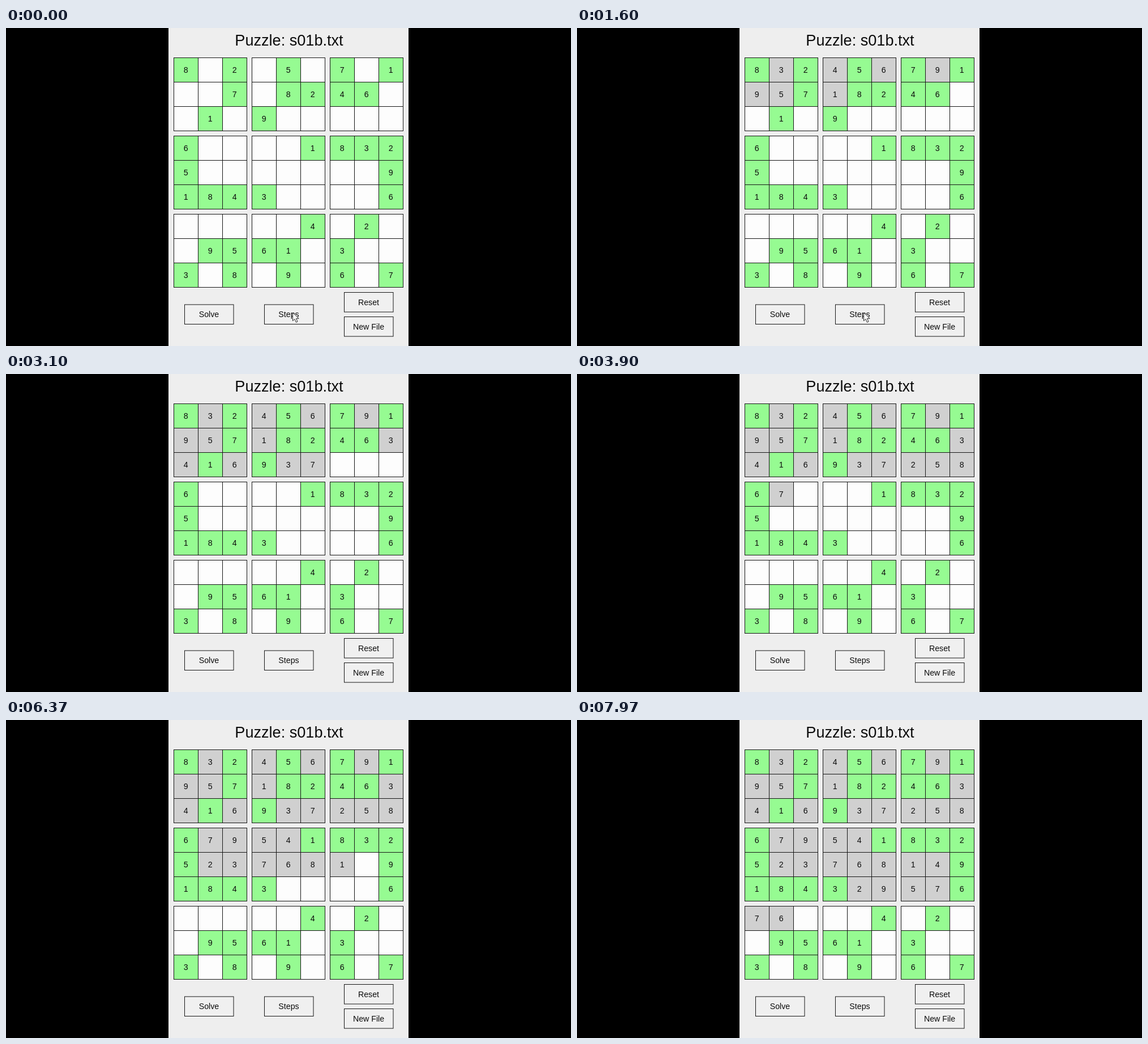
Write an HTML page that moves like this. It is 998x561 px and loops after 8 s.

```html
<!DOCTYPE html>
<html lang="en">
<head>
<meta charset="utf-8">
<title>Puzzle</title>
<style>
html, body { margin: 0; width: 100%; height: 100%; overflow: hidden; background: #000; }
svg { display: block; width: 998px; height: 561px; }
text { font-family: "Liberation Sans", Arial, sans-serif; font-size: 14.2px; fill: #0c0c0c; text-anchor: middle; }
.title { font-size: 27.1px; }
.box { stroke: #161616; stroke-width: 1; }
</style>
</head>
<body>
<svg id="stage" viewBox="0 0 998 561">
  <rect width="998" height="561" fill="#000"/>
  <rect x="287" width="424" height="561" fill="#eeeeee"/>
  <text class="title" x="500" y="31">Puzzle: s01b.txt</text>
  <g id="board"></g>
  <g id="buttons"></g>
  <path id="cursor" d="M0 0V14.6L3.4 11.5L5.9 17.2L8.5 16L6 10.6H10.6Z" fill="#f8f8f8" stroke="#2a2a2a" stroke-width="1" stroke-linejoin="round"/>
</svg>
<script>
const LOOP = 8000;
const NS = "http://www.w3.org/2000/svg";
const WHITE = "#fdfdfd", GREEN = "#96fb92", GRAY = "#d0d0d0";
const START = [
  "8.2.5.7.1", "..7.8246.", ".1.9.....",
  "6....1832", "5.......9", "1843....6",
  ".....4.2.", ".9561.3..", "3.8.9.6.7"
].join("");
const FILL = "34699513463725879542376814295776";
// Moment at which each digit of FILL appears, in reading order.
const TIMES = [
  30, 300, 570, 800, 1070, 1330, 1600, 1870, 2130, 2370, 2600,
  2870, 3130, 3370, 3630, 3900, 4170, 4430, 4670, 4900, 5200,
  5430, 5700, 5930, 6200, 6470, 6700, 6970, 7230, 7470, 7700, 7970
];
const get = id => document.getElementById(id);
const board = get("board"), buttons = get("buttons"), cursor = get("cursor");

function add(parent, tag, attrs, text = "") {
  const el = document.createElementNS(NS, tag);
  for (const key in attrs) el.setAttribute(key, attrs[key]);
  el.textContent = text;
  parent.appendChild(el);
  return el;
}

function box(parent, x, y, width, height, fill) {
  return add(parent, "rect", { class: "box", x, y, width, height, fill });
}

const offset = i => Math.floor(i / 3) * 138 + (i % 3) * 43;

const blanks = [];
[...START].forEach((digit, i) => {
  const x = 296.5 + offset(i % 9), y = 52.5 + offset(Math.floor(i / 9));
  const given = digit !== ".";
  const rect = box(board, x, y, 43, 43, given ? GREEN : WHITE);
  const label = add(board, "text", { x: x + 21.3, y: y + 26.3 }, given ? digit : "");
  if (!given) blanks.push({ rect, label });
});

[["Solve", 315.5, 488], ["Steps", 456.5, 488], ["Reset", 597.5, 466.5], ["New File", 597.5, 509.5]]
  .forEach(([name, x, y]) => {
    box(buttons, x, y, 86.5, 34.5, "#f0f0f0");
    add(buttons, "text", { x: x + 43, y: y + 22.4 }, name);
  });

const shown = [];

function draw(t) {
  TIMES.forEach((time, i) => {
    const on = t >= time;
    if (shown[i] === on) return;
    shown[i] = on;
    blanks[i].rect.setAttribute("fill", on ? GRAY : WHITE);
    blanks[i].label.textContent = on ? FILL[i] : "";
  });
  // The pointer slips out below the window.
  const p = Math.min(1, Math.max(0, (t - 1650) / 450));
  const ease = p * p * (3 - 2 * p);
  cursor.setAttribute("transform", `translate(${506.5 + 6 * ease} ${502 + 62 * ease})`);
}

function tick() {
  draw(performance.now() % LOOP);
  requestAnimationFrame(tick);
}
tick();
</script>
</body>
</html>
```
